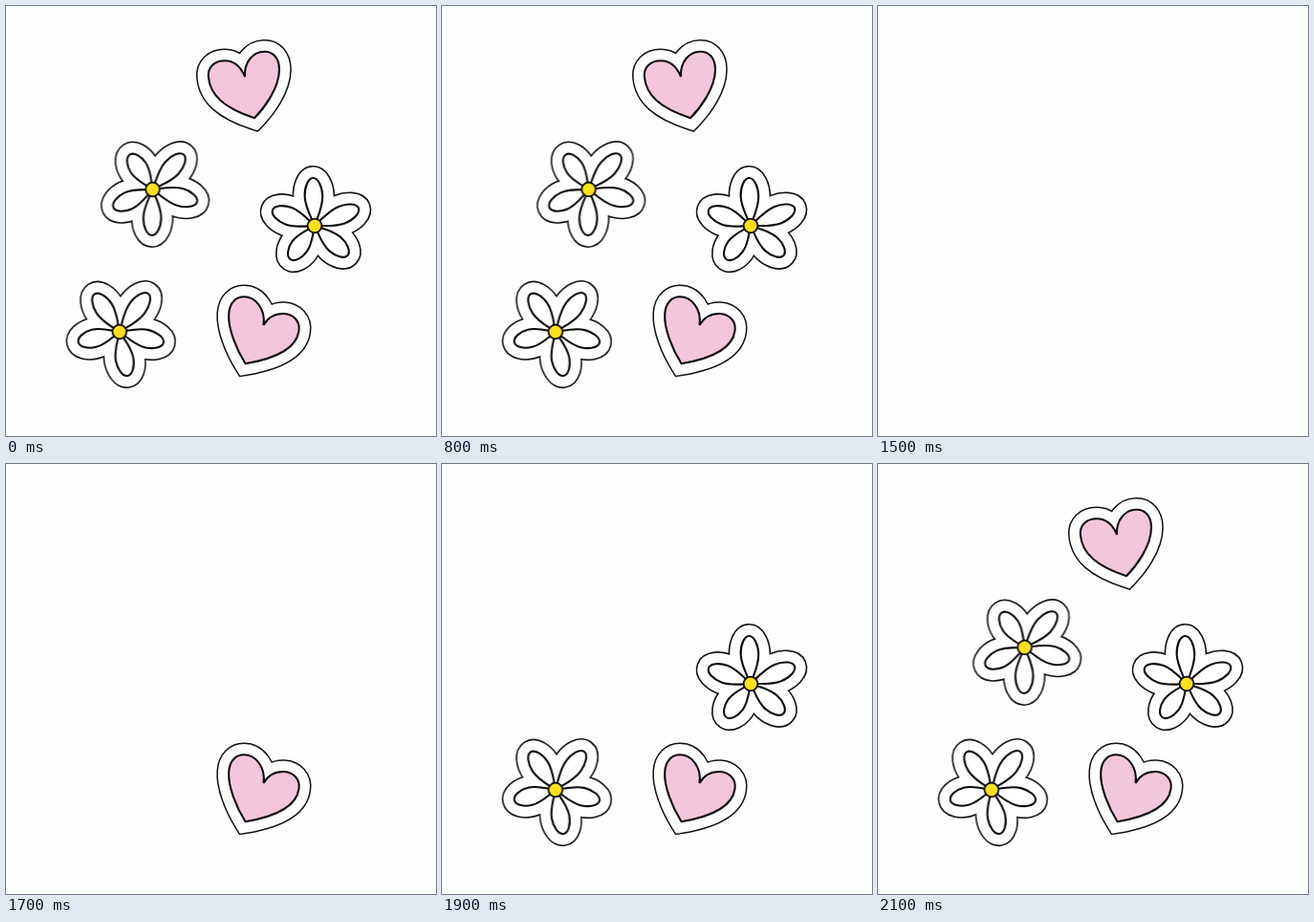
Recreate the animation shown at these times as an HTML page. Size 450x450 px, loop 2.2 s.

```html
<!DOCTYPE html>
<html lang="en">
<head>
<meta charset="utf-8">
<title>Stickers</title>
<style>
  html, body { margin: 0; width: 100%; height: 100%; overflow: hidden; background: #fdfffc; }
  svg { display: block; width: 100%; height: 100%; }
  .edge { fill: #111; stroke: #111; stroke-width: 26; }
  .paper { fill: #fff; stroke: #fff; stroke-width: 22.8; }
  .ink { fill: #fff; stroke: #0b0b0b; stroke-width: 2.1; }
  .heart { stroke-linejoin: miter; stroke-miterlimit: 2.5; }
  .heart .edge { stroke-width: 25.6; }
  .heart .paper { stroke-width: 22.6; }
  .heart .ink { fill: #f4c6dc; }
  .flower { stroke-linejoin: round; }
  .flower circle { fill: #ffe01b; stroke: #0b0b0b; stroke-width: 1.8; }

  /* everything vanishes at 1.5 s, then pops back one by one */
  .sticker { animation: 2200ms step-end infinite; }
  #s1 { animation-name: pop1; }
  #s2 { animation-name: pop2; }
  #s3 { animation-name: pop3; }
  #s4 { animation-name: pop4; }
  #s5 { animation-name: pop5; }
  @keyframes pop1 { 0%, 77.2727% { opacity: 1 } 68.1818% { opacity: 0 } 100% { opacity: 1 } }
  @keyframes pop2 { 0%, 81.8182% { opacity: 1 } 68.1818% { opacity: 0 } 100% { opacity: 1 } }
  @keyframes pop3 { 0%, 86.3636% { opacity: 1 } 68.1818% { opacity: 0 } 100% { opacity: 1 } }
  @keyframes pop4 { 0%, 90.9091% { opacity: 1 } 68.1818% { opacity: 0 } 100% { opacity: 1 } }
  @keyframes pop5 { 0%, 95.4545% { opacity: 1 } 68.1818% { opacity: 0 } 100% { opacity: 1 } }
</style>
</head>
<body>
<svg id="stage" viewBox="0 0 450 450"></svg>
<script>
  const layers = shape => ['edge', 'paper', 'ink']
    .map(name => `<g class="${name}">${shape}</g>`).join('');

  const heart = (id, d) =>
    `<g id="${id}" class="sticker heart">${layers(`<path d="${d}"/>`)}</g>`;

  // leaf-like petal from the flower's centre to the tip (x, y)
  function petal([x, y]) {
    const len = Math.hypot(x, y), h = 9.3;
    const turn = Math.atan2(y, x) * 180 / Math.PI;
    const p = (u, v) => `${(u * len).toFixed(2)} ${(v * h).toFixed(2)} `;
    const d = 'M0 0C' + p(.22, -.45) + p(.4, -1) + p(.62, -1) +
      'C' + p(.82, -1) + p(1, -.55) + p(1, 0) +
      'C' + p(1, .55) + p(.82, 1) + p(.62, 1) +
      'C' + p(.4, 1) + p(.22, .45) + '0 0Z';
    return `<path transform="rotate(${turn.toFixed(2)})" d="${d}"/>`;
  }

  const flower = (id, x, y, tips) =>
    `<g id="${id}" class="sticker flower" transform="translate(${x} ${y})">` +
    layers(tips.map(petal).join('')) + '<circle r="7.4"/></g>';

  document.getElementById('stage').innerHTML =
    heart('s1', 'M250.5 374.3C241 359 232 337 233.2 322C234 310 241 304.3 249 304.3' +
      'C261 304.3 272 317 269.5 334C274 326 282 321.7 291 322' +
      'C301 322.5 308 330 306.5 340C304 358 282 369 250.5 374.3Z') +
    flower('s2', 118.7, 341, [[-26, -39.5], [30, -40], [46, 11.5], [8.5, 46], [-43, 11]]) +
    flower('s3', 323, 230, [[-1.7, -50], [46, -18.5], [34.5, 31], [-25.5, 35], [-44, -16.5]]) +
    flower('s4', 153.5, 192, [[-24, -36.5], [32.5, -36.5], [46.5, 13], [-.7, 48], [-41, 19]]) +
    heart('s5', 'M260 117.3C270 107 286 86 286 66.5C286 54 279 47.3 270 47.7' +
      'C259 48 249 58 250 74C245 62 237 57.3 229 57.3' +
      'C218 57.3 211 64 211.8 74C213.5 94 229 107 260 117.3Z');
</script>
</body>
</html>
```
